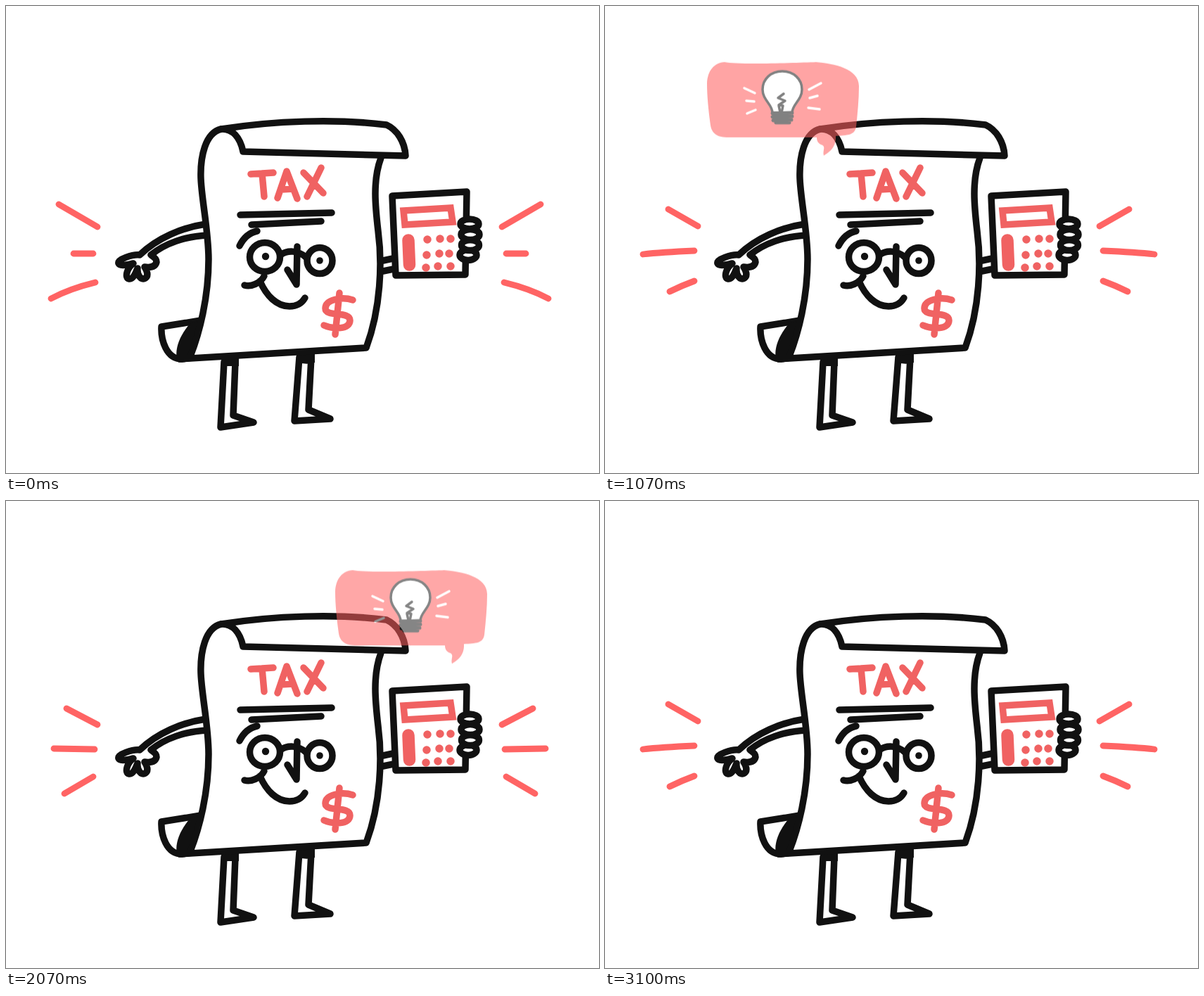
These frames come from a looping animation (843 px wide and 664 px high, 3.2 s). An HTML page:

```html
<!DOCTYPE html>
<html lang="en">
<head>
<meta charset="utf-8">
<title>Tax form with ideas</title>
<style>
  html, body { margin: 0; width: 100%; height: 100%; overflow: hidden; background: #fff; }
  svg { display: block; width: 843px; height: 664px; }

  :root {
    --ink: #111;
    --red: #f06262;
    --spark: #ff6464;
    --wide: path("M75 282L130 314M96 352L124 352M64 416Q90 402 127 393");
    --long: path("M90 289L132 313M54 353Q80 350 127 348M92 406Q108 398 127 391");
    --low: path("M69 286L127 313M91 350L123 350M62 415Q90 402 121 393");
    --even: path("M86 295L130 318M68 352L126 353M83 416L124 392");
  }

  .ink { fill: #fff; stroke: var(--ink); stroke-width: 9.5; }
  .red { fill: none; stroke: var(--red); stroke-width: 9.5; }
  .line { fill: none; }
  .solid { fill: var(--ink); stroke: none; }
  .ink, .red, .sparks, .bulb { stroke-linecap: round; stroke-linejoin: round; }

  .sparks { fill: none; stroke: var(--spark); stroke-width: 8.8; filter: blur(.7px); }
  .sparks path { d: var(--wide); animation: sparks 3200ms -2ms step-end infinite; }

  .first  { animation: first 3200ms -2ms linear infinite; }
  .second { animation: second 3200ms -2ms linear infinite; }

  @keyframes sparks {
    0%, 22.5%, 45.625%, 68.4375%, 90.625% { d: var(--wide); }
    5.625%, 28.75%, 51.5625%, 73.125%, 96.875%, 100% { d: var(--long); }
    11.25%, 34.375%, 57.1875%, 79.375% { d: var(--low); }
    16.875%, 40.9375%, 62.8125%, 85% { d: var(--even); }
  }

  /* Each bubble rises in, rests, then rises out in 30 ms ticks. */
  @keyframes first {
    0% { opacity: 0; transform: translateY(63px); }
    4.6875% { opacity: 0; transform: translateY(63px); animation-timing-function: steps(19); }
    22.5% { opacity: 1; transform: translateY(0); }
    27.8125% { opacity: 1; transform: translateY(0); animation-timing-function: steps(14); }
    40.9375%, 100% { opacity: 0; transform: translateY(-52px); }
  }
  @keyframes second {
    0% { opacity: 0; transform: translateY(63px); }
    54.375% { opacity: 0; transform: translateY(63px); animation-timing-function: steps(20); }
    73.125% { opacity: 1; transform: translateY(0); }
    78.4375% { opacity: 1; transform: translateY(0); animation-timing-function: steps(13); }
    90.625%, 100% { opacity: 0; transform: translateY(-78px); }
  }
</style>
</head>
<body>
<svg viewBox="0 0 843 664">
  <defs>
    <g id="bubble" transform="translate(0 -10)">
      <path fill="#ff6060" d="M170 112C190 116 270 113 300 112C325 114 361 121 361 146C361 165 359 185 357 204C355 216 345 216 328 217C329 233 319 240 311 245C309 238 314 233 309 230C303 228 301 224 301 219L180 219C160 220 152 214 150 202C147 180 145 160 145 142C146 124 155 113 170 112Z"/>
      <g class="bulb" fill="none" stroke="#222" stroke-width="3.5">
        <path fill="#fff" d="M238 184C238 172 224 166 224 151C224 136 236 125 252 125C268 125 280 136 280 151C280 166 266 172 266 184Z"/>
        <path d="M254 157L246 163L256 167L247 173L253 174L251 184M247 174L249 183"/>
        <path stroke-width="5" d="M238 185L266 184M238 190L266 189M239 195L265 194M243 198L262 198"/>
        <path stroke="#fff" d="M198 149L213 156M201 167L212 168M202 185L214 180M290 151L307 142M291 163L302 160M289 177L305 179"/>
      </g>
    </g>
  </defs>

  <g class="sparks">
    <path/>
    <path transform="translate(835 0) scale(-1 1)"/>
  </g>

  <g class="ink">
    <!-- legs -->
    <path d="M310 506L305 599L352 592L323 582L326 506"/>
    <path d="M417 499L410 590L461 587L430 574L434 499"/>
    <path class="solid" d="M306 500H331V512H306ZM413 494H439V507Q426 511 413 506Z"/>

    <!-- arms and hand -->
    <path class="line" d="M284 310C250 315 215 330 190 354C180 353 158 360 160 366C162 371 175 367 181 366C172 372 168 387 175 388C181 389 185 378 187 373C186 382 192 391 198 387C204 383 199 374 197 371C204 372 212 372 214 364C214 357 207 356 206 354C225 338 255 327 288 326"/>
    <path class="line" d="M536 362L550 359M536 377L551 374"/>

    <!-- paper -->
    <path d="M277 447L221 456C220 475 228 502 250 502L264 500Z"/>
    <path class="solid" d="M279 446L261 452C246 470 240 487 243 503L264 502Z"/>
    <path stroke="none" d="M306 175Q430 156 541 169L533 216C521 248 525 285 529 320C535 365 533 430 513 485L262 498C275 465 288 415 288 360C288 320 278 275 277 245C276 215 283 180 306 175Z" style="stroke:none"/>
    <path class="line" d="M533 216C521 248 525 285 529 320C535 365 533 430 512 486L247 502M306 175C283 180 276 215 277 245C278 275 288 320 288 360C288 415 275 465 262 498"/>
    <path d="M306 175C380 163 470 160 541 169C556 176 567 193 568 213L337 207C333 187 322 174 306 175Z"/>

    <!-- rules and face -->
    <path class="line" d="M333 297L463 294M349 311L448 306M332 341C338 329 347 322 357 320"/>
    <ellipse cx="368" cy="357" rx="21.5" ry="20.5"/>
    <ellipse cx="446" cy="362" rx="18" ry="18.5"/>
    <circle class="solid" cx="369" cy="356" r="5.2"/>
    <circle class="solid" cx="446" cy="362" r="4.8"/>
    <path class="line" d="M390 354C400 347 415 347 426 357M414 342L413 396L400 375M339 397C348 400 362 394 367 384M361 391C370 412 385 427 403 427C414 427 421 422 425 415"/>

    <!-- calculator -->
    <path d="M549 270L655 264L653 382L554 383Z"/>
  </g>

  <g class="red">
    <path aria-label="TAX" d="M348 239L380 237M364 238L367 271M386 273L399 235L414 274M391 261L408 260M423 237L451 266M448 230L428 271"/>
    <path aria-label="$" d="M493 418C478 413 454 417 454 430C454 443 489 433 489 447C489 460 466 460 452 454M474 408L468 467"/>
    <path stroke-linejoin="miter" d="M565 291L632 287L635 307L567 311Z"/>
    <path style="stroke-width:17.5" d="M572 333L573.5 368"/>
    <path style="stroke-width:11.5" d="M599 332h0M617 331h0M632 331h0M598 354h0M616 352h0M630 352h0M597 372h0M614 370h0M632 370h0"/>
  </g>

  <!-- fingers -->
  <g class="ink">
    <ellipse cx="657" cy="354" rx="12" ry="7.5"/>
    <ellipse cx="660" cy="340" rx="12.5" ry="7.5"/>
    <ellipse cx="660" cy="325" rx="13" ry="7.5"/>
    <ellipse cx="659" cy="310" rx="13" ry="7"/>
  </g>

  <g class="first"><use href="#bubble"/></g>
  <g transform="translate(323 -32)"><g class="second"><use href="#bubble"/></g></g>
</svg>
</body>
</html>
```
